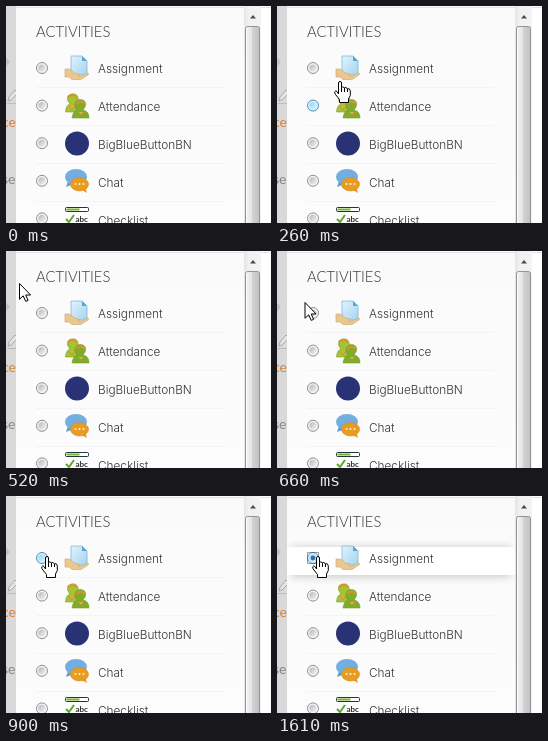
An HTML page for the animation above (3100 ms loop, 265x217 px).

```html
<!DOCTYPE html>
<html lang="en">
<head>
<meta charset="utf-8">
<title>Activity chooser</title>
<style>
html, body { margin: 0; width: 100%; height: 100%; overflow: hidden; background: #fff; }
svg { display: block; width: 100vw; height: 100vh; }
text { font-family: Lato, "Open Sans", sans-serif; }
.label { font-family: Inter, "Open Sans", sans-serif; font-size: 11.8px; font-weight: 300; fill: #333; }
.title { font-size: 14.8px; font-weight: 300; fill: #333; }
</style>
</head>
<body>
<svg viewBox="0 0 265 217" xmlns="http://www.w3.org/2000/svg">
  <defs>
    <linearGradient id="panel" x2="0" y2="1">
      <stop stop-color="#f9f9f9"/><stop offset=".22" stop-color="#fbfbfb"/><stop offset="1" stop-color="#fcfcfc"/>
    </linearGradient>
    <linearGradient id="thumb">
      <stop stop-color="#f4f4f4"/><stop offset=".45" stop-color="#e4e4e5"/>
      <stop offset=".5" stop-color="#d2d2d4"/><stop offset="1" stop-color="#c2c2c5"/>
    </linearGradient>
    <linearGradient id="track">
      <stop stop-color="#e5e5e5"/><stop offset=".3" stop-color="#f1f1f1"/><stop offset="1" stop-color="#f3f3f3"/>
    </linearGradient>
    <linearGradient id="idle" x2="1" y2="1">
      <stop stop-color="#b4b7bb"/><stop offset="1" stop-color="#f4f4f4"/>
    </linearGradient>
    <linearGradient id="hot" x2="1" y2="1">
      <stop stop-color="#8fd0f2"/><stop offset="1" stop-color="#e6f6fe"/>
    </linearGradient>
    <linearGradient id="down" x2="1" y2="1">
      <stop stop-color="#5fa9d2"/><stop offset="1" stop-color="#c0e5f8"/>
    </linearGradient>
    <linearGradient id="paper" x2="1" y2="1">
      <stop stop-color="#e3f3fc"/><stop offset="1" stop-color="#a3d4f0"/>
    </linearGradient>
    <filter id="soft" x="-20%" y="-100%" width="140%" height="300%"><feGaussianBlur stdDeviation="4.5"/></filter>
    <clipPath id="inside"><rect x="10" y="2" width="228" height="215"/></clipPath>
    <clipPath id="side"><rect width="10.5" height="217"/></clipPath>
  </defs>

  <rect width="265" height="217" fill="#fff"/>
  <g clip-path="url(#side)">
    <rect width="11" height="217" fill="#d9d9d9"/>
    <path d="M-1 50L4 56L-1 61" fill="#c3c3c3"/>
    <path d="M2 95L3 91L9 84L12 87L5 94Z" fill="#e3e3e3" stroke="#aaa"/>
    <path d="M1 97.500H11" stroke="#bbb"/>
    <text x="-4" y="121" font-size="14" fill="#d98032">ce</text>
    <text x="-4" y="178" font-size="14" fill="#858585">se</text>
  </g>
  <rect x="10" width="228" height="217" fill="url(#panel)"/>
  <path d="M10 1.500H265" stroke="#e2e2e2"/>
  <text class="title" x="30" y="31">ACTIVITIES</text>
  <g id="lines" stroke="#f4f4f4"></g>
  <g id="chosen" clip-path="url(#inside)">
    <rect x="14" y="51" width="220" height="30" fill="#ccc" filter="url(#soft)"/>
    <rect x="10" y="51" width="228" height="28" fill="#fff"/>
  </g>
  <g id="rows"></g>

  <g id="assignment">
    <path d="M65 50H76L81 55V69H65Z" fill="url(#paper)" stroke="#7db9de" stroke-width=".8"/>
    <path d="M76 50V55H81Z" fill="#5ca5d2"/>
    <path d="M59 63L63 63Q66 64 68 67L73 68Q74 69.500 72 70L75 70L81 67Q83.500 67 82 69L75 73.500H66L63 71H59Z" fill="#ebc78f" stroke="#c9a56c" stroke-width=".6"/>
  </g>
  <g id="attendance" stroke="#7b9a20" stroke-width=".6">
    <path d="M59.500 106Q60 99 64 98Q60 94 62 90Q65 87 69 88Q73 90 72 95L70 98Q75 99 75 106Z" fill="#a5c435"/>
    <path d="M66 112Q67 105 71 104Q68 101 69 97Q72 92 77 94Q81 96 79 101L77 104Q83 105 83 112Z" fill="#7fac2c"/>
    <path d="M62 91Q66 87 71 91M70 98Q75 93 79 98" fill="none" stroke="#d9952c" stroke-width="2"/>
    <path d="M63 100L66 104L69 100M72 106L75 109L78 106" fill="#e0ad3e" stroke="#b98a25"/>
  </g>
  <circle cx="71" cy="137.500" r="12" fill="#283274"/>
  <g id="chat">
    <path d="M62 175L60 181L68 178Z" fill="#5f9fd6"/>
    <ellipse cx="70" cy="171" rx="11" ry="8" fill="#72aee0"/>
    <path d="M74 183L81 187L79 180Z" fill="#e59a22"/>
    <ellipse cx="73.500" cy="178.300" rx="9" ry="6.700" fill="#e99c22" stroke="#d58b19" stroke-width=".6"/>
    <g fill="#fff3d8"><circle cx="69.500" cy="178" r="1"/><circle cx="73.500" cy="178" r="1"/><circle cx="77.500" cy="178" r="1"/></g>
  </g>
  <g id="checklist">
    <rect x="59.500" y="201.500" width="23" height="4" rx="1" fill="#fff" stroke="#26343c"/>
    <rect x="60.500" y="202.500" width="13" height="2" fill="#74b82e"/>
    <path d="M60 213L63 216L68 209" fill="none" stroke="#62a42b" stroke-width="2"/>
    <text x="69.500" y="216" font-size="8" font-weight="700" fill="#333">abc</text>
  </g>

  <rect x="238" width="17" height="217" fill="url(#track)"/>
  <path d="M244 12.500L247 9L250 12.500Z" fill="#4a4a4a"/>
  <rect x="239.500" y="20.500" width="14" height="205" rx="2" fill="url(#thumb)" stroke="#939396"/>
  <path d="M240.500 23V217" stroke="#fff" stroke-opacity=".7"/>

  <g id="cursor" stroke="#000" fill="#fff" stroke-linejoin="round">
    <path id="arrow" d="M.5 .5V16.300L4.200 12.800L6.700 18.400L9.100 17.400L6.700 12H11.600Z"/>
    <g id="hand" transform="translate(-6 0)">
      <path d="M4.500 13V2Q4.500 .5 6 .5T7.500 2V6.500Q8.800 5 10.300 6.800Q12 5.700 13.300 7.700Q16 7 16.300 9.800V14.500L14.500 18V21.500H5.500V18.500L1 12.800Q0 10.500 1.800 9.800Q3 9.800 4.500 13Z"/>
      <path d="M7.500 6.500V11M10.500 7V11M13.500 8V11" fill="none"/>
    </g>
  </g>
</svg>
<script>
const LOOP = 3100, PRESS = 1230, CHECK = 1610, PITCH = 38;
const $ = id => document.getElementById(id);
const show = (el, on) => el.setAttribute("visibility", on ? "visible" : "hidden");

// time, pointer x, pointer y
const moves = [
  [60, 181, 190], [110, 152, 160], [160, 122, 131], [210, 92, 101], [260, 63, 75],
  [330, 36, 42], [400, 18, 30], [470, 14, 31], [520, 13, 32],
  [590, 20, 41], [660, 27.5, 51], [740, 33, 55], [790, 37, 58], [850, 39, 59], [900, 41, 60]
];
const labels = ["Assignment", "Attendance", "BigBlueButtonBN", "Chat", "Checklist"];

function add(parent, tag, attrs) {
  const el = document.createElementNS("http://www.w3.org/2000/svg", tag);
  for (const k in attrs) el.setAttribute(k, attrs[k]);
  return parent.appendChild(el);
}

const radios = labels.map((name, i) => {
  const y = 62 + i * 37.6;
  add($("rows"), "text", { class: "label", x: 92, y: 67 + i * PITCH }).textContent = name;
  add($("lines"), "path", { d: `M30 ${81.5 + i * PITCH}H218` });
  add($("rows"), "circle", { cx: 36, cy: y, r: 5.9, fill: "#fff" });
  const ring = add($("rows"), "circle", { cx: 36, cy: y, r: 5.5 });
  const core = add($("rows"), "circle", { cx: 36, cy: y, r: 3.6 });
  return { ring, core };
});
const dot = add($("rows"), "circle", { cx: 36, cy: 62, r: 2.4, fill: "#2a7aa8" });
const focus = add($("rows"), "rect", {
  x: 30.5, y: 56.5, width: 11, height: 11, fill: "none", stroke: "#444", "stroke-dasharray": "1 1"
});

const rowAt = p => p && p[1] >= 30 && p[2] >= 44 ? Math.floor((p[2] - 44) / PITCH) : -1;

function draw(t) {
  const step = moves.filter(m => m[0] <= t).length - 1;
  const at = moves[step];
  // hover lags one step behind the pointer
  const hover = rowAt(moves[step - 1]);
  const pressed = t >= PRESS, checked = t >= CHECK;

  radios.forEach(({ ring, core }, i) => {
    const hot = i === hover;
    ring.setAttribute("stroke", hot ? "#4d8fb8" : "#8e8f8f");
    ring.setAttribute("fill", hot ? "#d9f1fc" : "#f4f4f4");
    core.setAttribute("fill", `url(#${!hot ? "idle" : pressed && !checked ? "down" : "hot"})`);
  });
  show($("chosen"), checked);
  show(dot, checked);
  show(focus, pressed);

  const hand = rowAt(at) >= 0;
  show($("arrow"), at && !hand);
  show($("hand"), at && hand);
  if (at) $("cursor").setAttribute("transform", `translate(${at[1]} ${at[2]})`);
}

let start;
function tick(now) {
  start ??= now;
  draw((now - start) % LOOP);
  requestAnimationFrame(tick);
}
draw(0);
requestAnimationFrame(tick);
</script>
</body>
</html>
```
